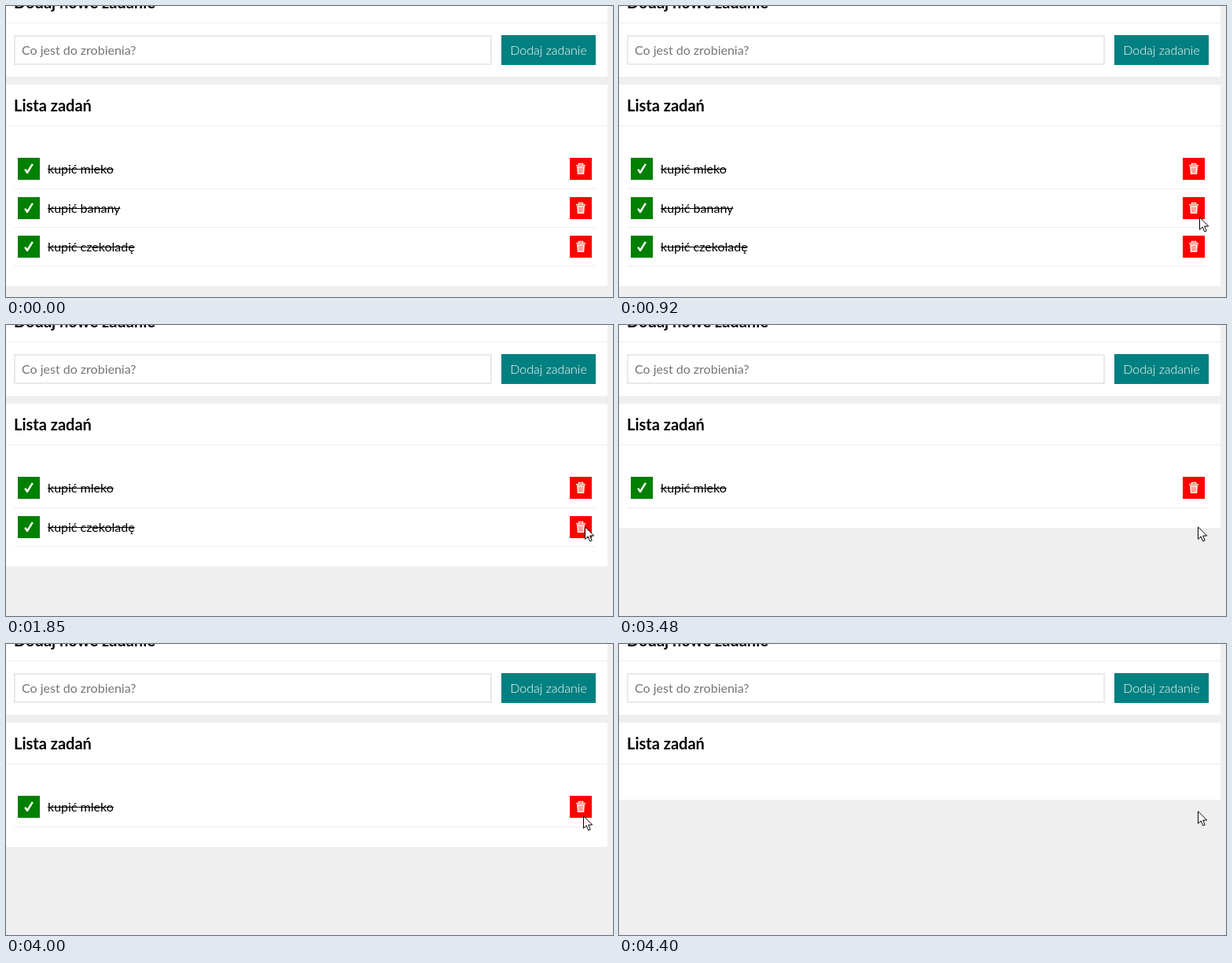
Animation, 772 px wide and 370 px high, one loop 4570 ms. Source, as an HTML page:

```html
<!DOCTYPE html>
<html lang="pl">
<head>
<meta charset="utf-8">
<title>Lista zadań</title>
<style>
  :root { --loop: 4570ms step-end infinite; }
  * { box-sizing: border-box; }
  html, body { margin: 0; width: 100%; height: 100%; overflow: hidden; }
  body { position: relative; background: #efefef; color: #000; font: 16px/20px Lato, sans-serif; }
  .card { position: absolute; left: 0; width: 765px; background: #fff; }
  .new { top: -31px; height: 121px; }
  .list { top: 100px; height: 256px; animation: shrink var(--loop); }
  h2 { margin: 0; height: 53px; padding-left: 10px; border-bottom: 1px solid #eee; font: 700 20px/52px Lato, sans-serif; }
  .field, .add { position: absolute; top: 68px; height: 38px; }
  .field { left: 10px; width: 608px; padding-left: 8px; border: 2px solid #e8eaea; color: #757575; line-height: 34px; }
  .add { left: 630px; width: 120px; background: teal; color: #fff; font-weight: 300; line-height: 38px; text-align: center; }
  .item { position: absolute; left: 10px; width: 740px; height: 39px; border-bottom: 1px solid #eee; line-height: 28px; }
  .item s { position: absolute; left: 43px; }
  .item svg { position: absolute; top: 0; width: 28px; height: 28px; }
  .done { left: 5px; background: green; }
  .del { right: 5px; background: red; }
  .milk { top: 93px; height: 40px; animation: milk var(--loop); }
  .bananas { top: 143px; animation: bananas var(--loop); }
  .chocolate { top: 192px; animation: chocolate var(--loop); }
  .cursor { position: absolute; left: 0; top: 0; width: 14px; height: 21px; animation: move var(--loop); }

  @keyframes shrink {
    0% { height: 256px; }
    40.48% { height: 207px; }
    76.14% { height: 158px; }
    96.28%, 100% { height: 98px; }
  }
  @keyframes milk { 0% { visibility: visible; } 96.28%, 100% { visibility: hidden; } }
  @keyframes bananas { 0% { visibility: visible; } 40.48%, 100% { visibility: hidden; } }
  @keyframes chocolate {
    0% { top: 192px; visibility: visible; }
    40.48% { top: 143px; visibility: visible; }
    76.14%, 100% { top: 143px; visibility: hidden; }
  }
  @keyframes move {
    0% { transform: translate(800px, 400px); }
    14.44% { transform: translate(745px, 330px); }
    17.28% { transform: translate(741px, 292px); }
    20.13% { transform: translate(738px, 268px); }
    22.97% { transform: translate(736px, 257px); }
    26.25% { transform: translate(736px, 256px); }
    81.83% { transform: translate(736px, 251px); }
    84.68% { transform: translate(735px, 234px); }
    87.52% { transform: translate(734px, 218px); }
    90.37% { transform: translate(735px, 213px); }
    93.43%, 100% { transform: translate(736px, 212px); }
  }
</style>
</head>
<body>
<svg width="0" height="0" style="position:absolute">
  <symbol id="check" viewBox="0 0 28 28">
    <path d="M8.2 15.2 10 13.9 12 16.4 17.6 7.6 20 8.2 12.8 20H11.3Z" fill="#fff"/>
  </symbol>
  <symbol id="bin" viewBox="0 0 28 28">
    <path d="M11.5 9V7.5H16.5V9M8 9.7H20" fill="none" stroke="#ffeadb" stroke-width="1.6"/>
    <path d="M9 11H19L18.2 21H9.8Z" fill="#ffeadb"/>
    <path d="M11.9 12.5 12.2 19.5M14 12.5V19.5M16.1 12.5 15.8 19.5" stroke="#f55" stroke-width=".9"/>
  </symbol>
</svg>

<section class="card new">
  <h2>Dodaj nowe zadanie</h2>
  <div class="field">Co jest do zrobienia?</div>
  <div class="add">Dodaj zadanie</div>
</section>

<section class="card list">
  <h2>Lista zadań</h2>
  <div class="item milk"><svg class="done"><use href="#check"/></svg><s>kupić mleko</s><svg class="del"><use href="#bin"/></svg></div>
  <div class="item bananas"><svg class="done"><use href="#check"/></svg><s>kupić banany</s><svg class="del"><use href="#bin"/></svg></div>
  <div class="item chocolate"><svg class="done"><use href="#check"/></svg><s>kupić czekoladę</s><svg class="del"><use href="#bin"/></svg></div>
</section>

<svg class="cursor" viewBox="0 0 14 21">
  <path d="M.5.8V16.3L4.2 12.9 6.7 18.9 9.2 17.9 6.7 12H11.7Z" fill="#fff" stroke="#000"/>
</svg>
</body>
</html>
```
